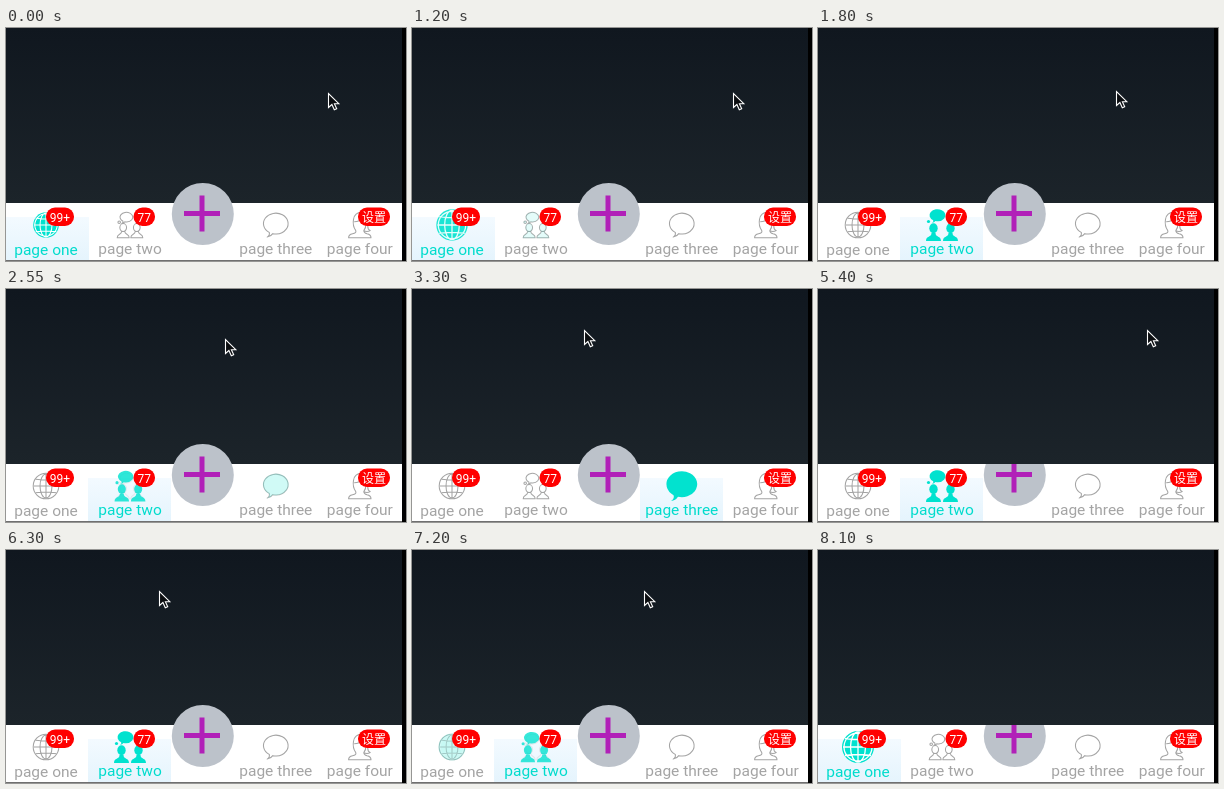
Recreate the animation shown at these times as an HTML page with a canvas. Size 400 px wide and 233 px high, loop 8850 ms.

```html
<!DOCTYPE html>
<html lang="en">
<head>
<meta charset="utf-8">
<title>Tab bar</title>
<style>
html, body { margin: 0; width: 100%; height: 100%; overflow: hidden; background: #000; }
canvas { display: block; width: 400px; height: 233px; }
</style>
</head>
<body>
<canvas id="stage"></canvas>
<script>
const LOOP = 8850, STEP = 150, REST = .8;
const TEAL = '#00e2cf', GRAY = '#a4a4a4';
const canvas = document.getElementById('stage');
const ctx = canvas.getContext('2d');
const ratio = window.devicePixelRatio || 1;
canvas.width = 400 * ratio;
canvas.height = 233 * ratio;

// Turning points of the pointer: time, x
const turns = [
  [450, 322], [1050, 344], [1500, 256], [2100, 340], [3000, 98], [3450, 198],
  [3750, 198], [5200, 388], [5400, 329], [5700, 333], [6450, 132], [7800, 304]
];

function ease(t, from, to) {
  const u = Math.min(1, Math.max(0, (t - from) / (to - from)));
  return u * u * (3 - 2 * u);
}

function pointerX(t) {
  return turns.slice(1).reduce((x, [end, to], i) => {
    const [start, from] = turns[i];
    return x + (to - from) * ease(t, start, end);
  }, turns[0][1]);
}

const pointerY = t => 65 - 24 * ease(t, 1500, 3300);

// Two swipes forward, two swipes back
const pageAt = t => ease(t, 1050, 1800) + ease(t, 2250, 3350)
  - ease(t, 4400, 5300) - ease(t, 6850, 8000);

function ellipse(x, y, rx, ry) {
  ctx.moveTo(x + rx, y);
  ctx.ellipse(x, y, rx, ry, 0, 0, Math.PI * 2);
}

function paint(full) {
  if (full) ctx.fill(); else ctx.stroke();
}

function globe(full) {
  ctx.beginPath();
  ellipse(0, 0, 16, 16);
  paint(full);
  ctx.beginPath();
  if (full) {
    ctx.strokeStyle = '#fff';
    ellipse(0, 0, 14, 14);
  }
  ellipse(0, 0, 7.5, 15);
  ctx.moveTo(0, -15); ctx.lineTo(0, 15);
  ctx.moveTo(-15, 0); ctx.lineTo(15, 0);
  for (const s of [-1, 1]) {
    ctx.moveTo(-13, 8.5 * s);
    ctx.quadraticCurveTo(0, 6.5 * s, 13, 8.5 * s);
  }
  ctx.stroke();
}

function speech(x, y, rx, ry, full) {
  ctx.beginPath();
  ctx.ellipse(x, y, rx, ry, 0, Math.PI * .68, Math.PI * 2.58);
  ctx.quadraticCurveTo(x - rx * .4, y + ry * 1.25, x - rx * .7, y + ry * 1.3);
  ctx.quadraticCurveTo(x - rx * .45, y + ry * 1.1, x - rx * .54, y + ry * .84);
  ctx.closePath();
  paint(full);
}

function bust(x, full) {
  ctx.beginPath();
  ellipse(x, 3.2, 4.2, 5);
  paint(full);
  ctx.beginPath();
  ctx.moveTo(x - 7.5, 16);
  ctx.bezierCurveTo(x - 7.5, 10.5, x - 2, 12.5, x - 2, 8);
  ctx.lineTo(x + 2, 8);
  ctx.bezierCurveTo(x + 2, 12.5, x + 7.5, 10.5, x + 7.5, 16);
  ctx.closePath();
  paint(full);
}

function people(full) {
  speech(-4.5, -9.8, 8, 6, full);
  ctx.beginPath();
  ellipse(-13.5, -3.5, 1.6, 1.6);
  paint(full);
  bust(-8.5, full);
  bust(8.5, full);
}

function chat(full) {
  speech(0, -1.8, 15.4, 13, full);
}

function woman() {
  ctx.beginPath();
  ctx.moveTo(-5, 7);
  ctx.bezierCurveTo(-10, 0, -10, -16, 2, -16);
  ctx.bezierCurveTo(13, -16, 11, -3, 10, 2);
  ctx.quadraticCurveTo(10, 6, 13, 7);
  ctx.quadraticCurveTo(9, 9, 5, 7);
  ctx.quadraticCurveTo(5, 10, 9, 11);
  ctx.quadraticCurveTo(14, 12, 14, 16);
  ctx.lineTo(-14, 16);
  ctx.quadraticCurveTo(-14, 12, -9, 11);
  ctx.quadraticCurveTo(-4, 10, -5, 7);
  ctx.moveTo(5, 7);
  ctx.bezierCurveTo(9, 2, 8, -5, 4, -9);
  ctx.quadraticCurveTo(0, -4, -7, -4);
  ctx.stroke();
}

const tabs = [
  { label: 'page one', x: 40, base: 227, left: 0, icon: globe, badge: ['99+', 40, 28] },
  { label: 'page two', x: 124, base: 226, left: 82, icon: people, badge: ['77', 127.5, 21.5] },
  { label: 'page three', x: 269.8, base: 226, left: 228, icon: chat },
  { label: 'page four', x: 353.8, base: 226, left: 312, icon: woman, badge: ['设置', 352, 32] }
];

function drawIcon(tab, full, scale, alpha) {
  if (alpha <= 0) return;
  ctx.save();
  ctx.translate(tab.x, 197);
  ctx.scale(scale, scale);
  ctx.globalAlpha = alpha;
  ctx.fillStyle = TEAL;
  ctx.strokeStyle = GRAY;
  ctx.lineWidth = 1.3;
  ctx.lineJoin = 'round';
  tab.icon(full);
  ctx.restore();
}

function drawBadge([text, x, w]) {
  ctx.fillStyle = '#f00';
  ctx.beginPath();
  ctx.roundRect(x, 179.5, w, 18.5, 9);
  ctx.fill();
  ctx.fillStyle = '#fff';
  ctx.font = '12px Roboto, "Noto Sans CJK SC", "Noto Sans CJK", sans-serif';
  ctx.fillText(text, x + w / 2, 193.5);
}

function drawTab(tab, i, page, grow) {
  const selected = i === Math.round(page);
  if (selected) {
    const glow = ctx.createLinearGradient(0, 189, 0, 232);
    glow.addColorStop(0, '#f3faff');
    glow.addColorStop(1, '#e5f4fd');
    ctx.fillStyle = glow;
    ctx.fillRect(tab.left, 189, 83, 43);
  }
  const on = Math.max(0, 1 - Math.abs(page - i));
  drawIcon(tab, false, REST, 1 - on);
  drawIcon(tab, true, REST + (1 - REST) * on * grow, on);
  ctx.fillStyle = selected ? '#00dccd' : GRAY;
  ctx.font = '15.5px Roboto, sans-serif';
  ctx.fillText(tab.label, tab.x, tab.base);
  if (tab.badge) drawBadge(tab.badge);
}

function drawButton(cut) {
  ctx.save();
  if (cut) {
    ctx.beginPath();
    ctx.rect(0, 175, 400, 58);
    ctx.clip();
  }
  ctx.fillStyle = '#bcc2ca';
  ctx.beginPath();
  ellipse(196.8, 186, 31, 31);
  ctx.fill();
  ctx.fillStyle = '#b120b8';
  ctx.fillRect(178, 183, 36, 5);
  ctx.fillRect(193.5, 167.5, 5, 36);
  ctx.restore();
}

function drawPointer(x, y) {
  ctx.save();
  ctx.translate(Math.round(x) + .5, Math.round(y) + .5);
  ctx.beginPath();
  ctx.moveTo(0, 0);
  for (const [px, py] of [[0, 14], [3.4, 11], [5.8, 16.2], [8.2, 15.2], [5.9, 10.2], [10.3, 10.2]]) ctx.lineTo(px, py);
  ctx.closePath();
  ctx.fillStyle = '#0b0d10';
  ctx.fill();
  ctx.strokeStyle = '#fff';
  ctx.lineWidth = 1.1;
  ctx.stroke();
  ctx.restore();
}

function draw(t) {
  ctx.setTransform(ratio, 0, 0, ratio, 0, 0);
  ctx.textAlign = 'center';
  const sky = ctx.createLinearGradient(0, 0, 0, 175);
  sky.addColorStop(0, '#10171f');
  sky.addColorStop(1, '#1c242a');
  ctx.fillStyle = sky;
  ctx.fillRect(0, 0, 400, 175);
  ctx.fillStyle = '#fff';
  ctx.fillRect(0, 175, 400, 58);

  // Icons keep their resting size until the first swipe
  const page = pageAt(t), grow = t < 1050 ? 0 : 1;
  tabs.forEach((tab, i) => drawTab(tab, i, page, grow));
  drawButton((t >= 5250 && t < 6000) || t >= 8100);

  ctx.fillStyle = '#707070';
  ctx.fillRect(0, 232, 400, 1);
  ctx.fillStyle = '#000';
  ctx.fillRect(396, 0, 4, 233);
  if (t < 7800) drawPointer(pointerX(t), pointerY(t));
}

const start = performance.now();
function tick() {
  const t = (performance.now() - start) % LOOP;
  draw(Math.floor(t / STEP) * STEP);
  requestAnimationFrame(tick);
}
tick();
</script>
</body>
</html>
```
